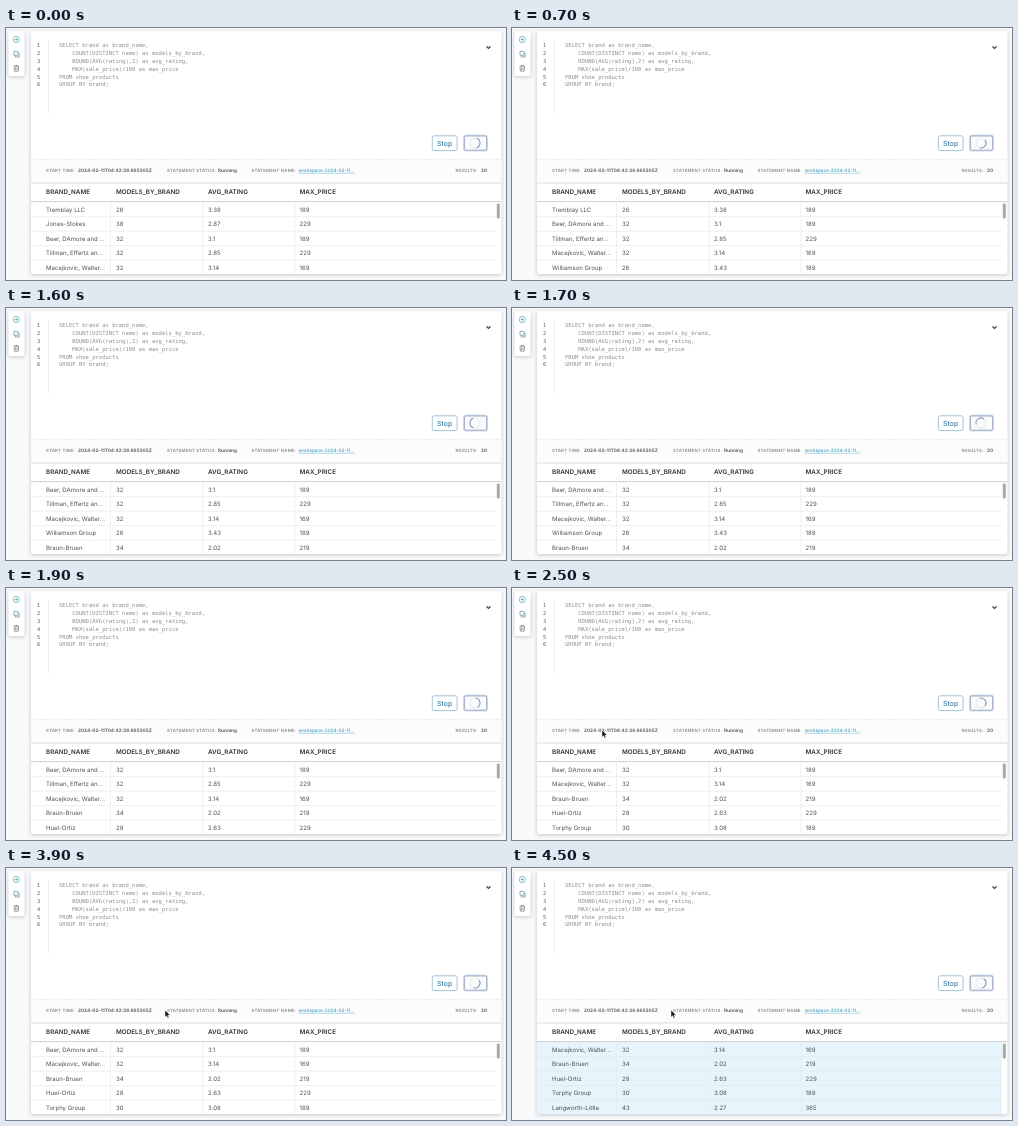
An HTML page for the animation above (4600 ms loop, 500 by 252 pixels).

```html
<!DOCTYPE html>
<html lang="en">
<head>
<meta charset="utf-8">
<title>Query results</title>
<style>
  html, body { margin: 0; width: 100%; height: 100%; overflow: hidden; background: #f9fafb; }
  svg { display: block; width: 500px; height: 252px; }
  text { font-family: Inter, "Liberation Sans", sans-serif; text-rendering: geometricPrecision; white-space: pre; }
  .code { font: 5.52px "DejaVu Sans Mono", "Liberation Mono", monospace; fill: #8c8e90; }
  .num { font: 5.3px "DejaVu Sans Mono", monospace; fill: #5c5e60; }
  .label { font-size: 4.3px; font-weight: 600; letter-spacing: .22px; fill: #85888c; }
  .value { font-size: 4.7px; font-weight: 700; fill: #606367; }
  .link { font-size: 4.62px; font-weight: 500; fill: #3d9cbc; }
  .head { font-size: 6.3px; font-weight: 600; fill: #2f3236; }
  .cell { font-size: 6.05px; fill: #4d5054; }
  .stop { font-size: 7px; font-weight: 500; fill: #357fa8; text-anchor: middle; }
  .panel { fill: #fff; filter: drop-shadow(0 1px 2.2px rgba(40, 50, 65, .26)); }
  .rule { stroke: #e6e8ea; stroke-width: .7; }
  .icon { fill: none; stroke-width: .8; }
</style>
</head>
<body>
<svg id="stage" viewBox="0 0 500 252" xmlns="http://www.w3.org/2000/svg">
  <rect class="panel" x="2.5" y="3" width="16" height="45" rx="2"/>
  <g class="icon" stroke="#68aebb">
    <circle cx="10.3" cy="11.5" r="3.1"/>
    <path d="M8.6 11.5h3.4M10.3 9.8v3.4"/>
  </g>
  <g class="icon" stroke="#6f9fb4">
    <path d="M8 23.4h3.9v3.9h-3.9zM12.2 25.1h1v3.9h-3.9v-1.4"/>
  </g>
  <g class="icon" stroke="#85888c">
    <path d="M7.5 38.4h5.6M9.3 38.2v-.9h2v.9M8.1 38.8l.3 4.4h3.8l.3-4.4M9.6 39.7v2.3M11 39.7v2.3"/>
  </g>

  <rect class="panel" x="25" y="3" width="470.5" height="243" rx="2"/>
  <path d="M42.5 12V85" stroke="#e0e2e4" stroke-width=".7"/>
  <path class="icon" d="M480.5 18.4l2 2 2-2" stroke="#303336" style="stroke-width:1.2"/>

  <rect x="426.3" y="107.8" width="24.8" height="14.8" rx="2" fill="#fff" stroke="#9dbccd" stroke-width=".9"/>
  <text class="stop" x="438.7" y="117.6">Stop</text>
  <rect x="457" y="106.6" width="25" height="17" rx="2.8" fill="#d3dcea"/>
  <rect x="458.4" y="108" width="22.2" height="14.2" rx="1.8" fill="#fafbfc" stroke="#8b9cba" stroke-width=".8"/>
  <circle cx="469" cy="115" r="5" fill="none" stroke="#e6eaef" stroke-width="1.1"/>
  <path id="spinner" d="M470.7 110.3A5 5 0 0 1 470.7 119.7" fill="none" stroke="#8a9fb4" stroke-width="1.1"/>

  <rect x="25" y="131" width="470.5" height="24" fill="#fcfcfd"/>
  <path d="M25 131.3H495.5" stroke="#e0e3e6" stroke-width=".7" stroke-dasharray="2 1"/>
  <path d="M25 155H495.5" stroke="#d5d8db" stroke-width=".9"/>
  <rect id="flash" x="25" y="173.8" width="465" height="72" fill="#e6f4fc"/>
  <g id="grid"></g>
  <g id="rows"></g>
  <rect x="490.8" y="175.5" width="3" height="15" rx="1.2" fill="#a6a8ab"/>
  <path id="cursor" d="M0 0V7.2L1.7 5.7L2.8 8.2L4 7.6L2.9 5.3H5.1Z" fill="#111" stroke="#fff" stroke-width=".5"/>
</svg>
<script>
const LOOP = 4600, STEP = 100, TURN = 640;
const COLS = [40, 110, 202, 293.5];
const $ = id => document.getElementById(id);

function add(parent, tag, attrs, text) {
  const el = document.createElementNS('http://www.w3.org/2000/svg', tag);
  for (const k in attrs) el.setAttribute(k, attrs[k]);
  if (text) el.textContent = text;
  parent.appendChild(el);
  return el;
}
const write = (parent, cls, x, y, text) => add(parent, 'text', { class: cls, x, y }, text);
const rule = d => add($('grid'), 'path', { class: 'rule', d });

const brands = [
  ['Tremblay LLC', 26, '3.38', 189],
  ['Jones-Stokes', 38, '2.87', 229],
  ['Beer, DAmore and ...', 32, '3.1', 189],
  ['Tillman, Effertz an...', 32, '2.85', 229],
  ['Macejkovic, Walter...', 32, '3.14', 169],
  ['Williamson Group', 26, '3.43', 189],
  ['Braun-Bruen', 34, '2.02', 219],
  ['Huel-Ortiz', 28, '2.63', 229],
  ['Torphy Group', 30, '3.08', 189],
  ['Langworth-Little', 43, '2.27', 365]
];
// [time, brand that leaves the list]
const updates = [[700, 1], [1300, 0], [1900, 5], [2500, 3], [4300, 2]];
// [time, x] of the pointer
const pointer = [[2500, 90], [3600, 90], [3900, 159], [LOOP, 159]];

const sql = [
  'SELECT brand as brand_name,',
  '    COUNT(DISTINCT name) as models_by_brand,',
  '    ROUND(AVG(rating),2) as avg_rating,',
  '    MAX(sale_price)/100 as max_price',
  'FROM shoe_products',
  'GROUP BY brand;'
];
sql.forEach((line, i) => {
  const y = 19 + i * 7.88;
  write($('grid'), 'num', 31, y, String(i + 1));
  write($('grid'), 'code', 53, y, line);
});

[
  ['label', 40, 'START TIME:'], ['value', 72, '2024-02-11T04:42:26.665305Z'],
  ['label', 161, 'STATEMENT STATUS:'], ['value', 212, 'Running'],
  ['label', 245.5, 'STATEMENT NAME:'], ['link', 292.5, 'workspace-2024-02-11...'],
  ['label', 449.5, 'RESULTS:'], ['value', 475, '20']
].forEach(([cls, x, text]) => write($('grid'), cls, x, 144.1, text));
add($('grid'), 'path', { d: 'M292.5 145.3H348.5', stroke: '#6bb5cd', 'stroke-width': .5 });

['BRAND_NAME', 'MODELS_BY_BRAND', 'AVG_RATING', 'MAX_PRICE']
  .forEach((name, i) => write($('grid'), 'head', COLS[i], 166.2, name));
add($('grid'), 'path', { d: 'M25 173.6H495.5', stroke: '#c9ccd0', 'stroke-width': .9 });
for (let i = 1; i < 5; i++) rule(`M25 ${174.2 + i * 14.5}H490`);
[104.5, 197, 289].forEach(x => rule(`M${x} 174V246`));

const cells = [0, 1, 2, 3, 4].map(r =>
  COLS.map(x => write($('rows'), 'cell', x, 183.5 + r * 14.5, ' ')));

function pointerX(t) {
  const i = pointer.findIndex(p => p[0] > t);
  if (i < 1) return pointer[0][1];
  const [t0, x0] = pointer[i - 1], [t1, x1] = pointer[i];
  const u = (t - t0) / (t1 - t0);
  return x0 + (x1 - x0) * u * u * (3 - 2 * u);
}

function draw(t) {
  const past = updates.filter(u => u[0] <= t);
  const gone = past.map(u => u[1]);
  const shown = brands.filter((b, i) => !gone.includes(i));
  cells.forEach((row, r) => row.forEach((cell, c) => { cell.textContent = shown[r][c]; }));

  const age = past.length ? t - past[past.length - 1][0] : LOOP;
  $('flash').style.display = age >= 100 && age < 300 ? '' : 'none';
  $('spinner').setAttribute('transform', `rotate(${t / TURN * 360} 469 115)`);
  $('cursor').style.display = t >= pointer[0][0] ? '' : 'none';
  $('cursor').setAttribute('transform', `translate(${pointerX(t)} 142)`);
}

const start = performance.now();
let last = -1;
function tick() {
  const t = Math.floor((performance.now() - start) % LOOP / STEP) * STEP;
  if (t !== last) draw(last = t);
  requestAnimationFrame(tick);
}
tick();
</script>
</body>
</html>
```
